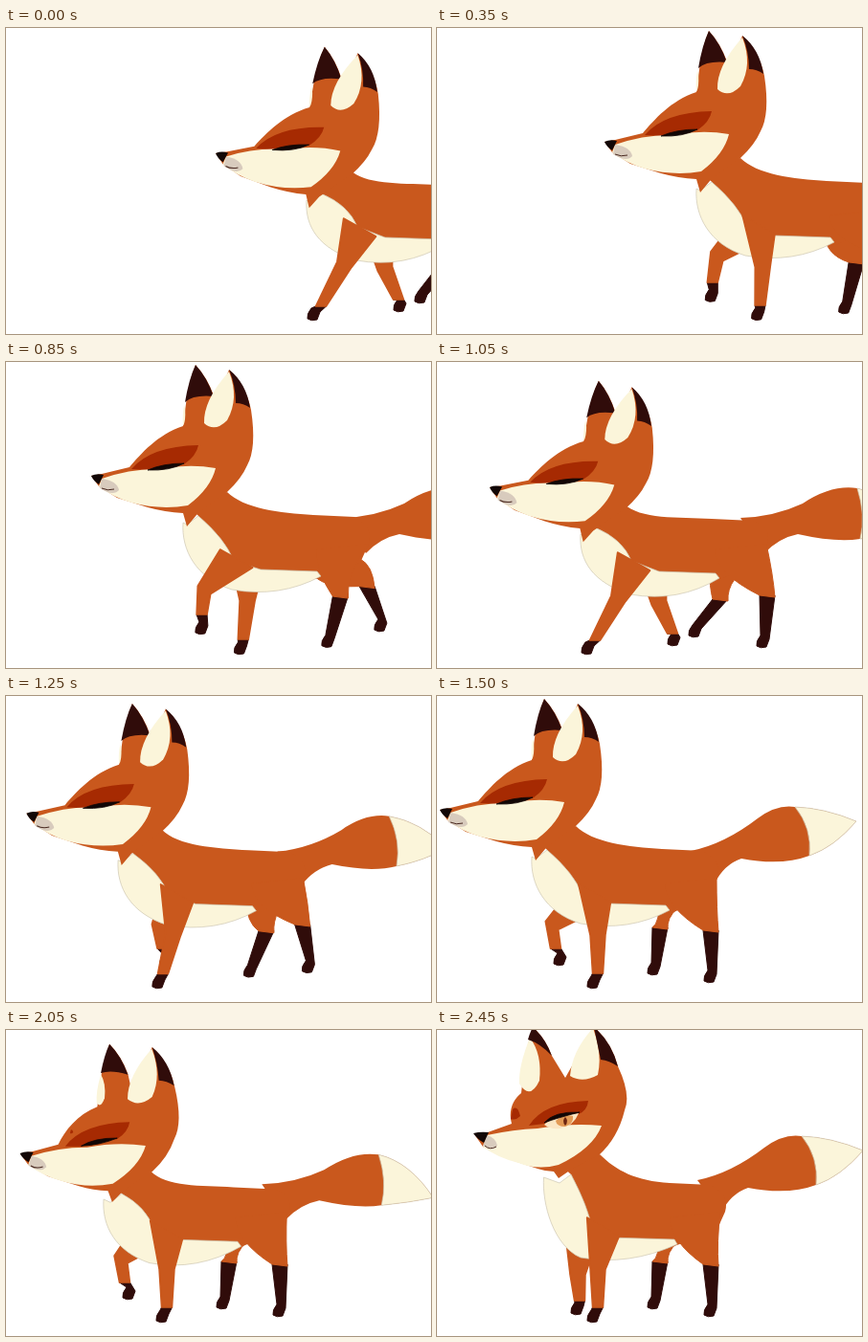
Animation, 444 px wide and 320 px high, one loop 2.5 s. Source, as an HTML page with a canvas:

```html
<!DOCTYPE html>
<html lang="en">
<head>
<meta charset="utf-8">
<title>Walking fox</title>
<style>
html, body { margin: 0; width: 100%; height: 100%; overflow: hidden; background: #fff; }
canvas { display: block; width: 444px; height: 320px; }
</style>
</head>
<body>
<canvas id="stage" width="444" height="320"></canvas>
<script>
const ctx = document.getElementById('stage').getContext('2d');
const LOOP = 2500, STEP = 50, CYCLE = 1050;
const ORANGE = '#c9581d', CREAM = '#fbf5da', DARK = '#300c0a', RED = '#a62a02', EDGE = '#cfc8b4';

const lerp = (a, b, k) => a + (b - a) * k;
const smooth = k => k * k * (3 - 2 * k);
const linear = k => k;
const blend = (a, b, k) => a.map((v, i) => lerp(v, b[i], k));

// Keys are [time, value, value, ...]; returns the values at t.
function track(t, keys, ease = smooth) {
  if (t <= keys[0][0]) return keys[0].slice(1);
  for (let i = 1; i < keys.length; i++) {
    const a = keys[i - 1], b = keys[i];
    if (t <= b[0]) return blend(a.slice(1), b.slice(1), ease((t - a[0]) / (b[0] - a[0])));
  }
  return keys[keys.length - 1].slice(1);
}

// Blends two path strings that share the same commands.
function morph(a, b, k) {
  const to = b.match(/-?\d+/g);
  let i = 0;
  return a.replace(/-?\d+/g, v => lerp(+v, +to[i++], k).toFixed(2));
}

function shape(path, color, edge, width = 1) {
  const p = new Path2D(path);
  if (color) { ctx.fillStyle = color; ctx.fill(p); }
  if (edge) { ctx.strokeStyle = edge; ctx.lineWidth = width; ctx.stroke(p); }
}

// Each head part: facing sideways, turned to the viewer, fill.
const HEAD = [
  ['M3 119L14 117L43 110C55 96 72 76 99 67L103 36Q106 18 112 3Q124 16 131 35L130 50L147 8Q165 25 170 50Q176 90 166 108Q160 122 145 136L113 160L103 172L99 158Q80 157 62 152L30 142L11 130Z',
   'M39 109L53 107L78 98C74 84 80 72 88 66L92 30Q96 10 100 -3Q113 8 120 27L134 50L164 -3Q182 12 189 38Q203 68 196 84Q189 113 169 131L140 146L127 155L122 148Q114 148 105 145L72 134L48 122Z', ORANGE],
  ['M100 45Q98 57 99 66Q100 66 101 60Q102 50 100 45', 'M97 8Q85 38 86 56Q97 74 107 53Q110 25 97 8', CREAM],
  ['M112 3Q105 18 101 42Q110 34 131 36Q124 16 112 3', 'M100 -3Q97 3 95 10Q108 14 120 27Q113 8 100 -3', DARK],
  ['M147 10Q120 40 121 64Q132 74 145 61Q158 38 147 10', 'M163 -2Q141 22 139 48Q152 56 168 47Q173 25 163 -2', CREAM],
  ['M147 8Q154 25 154 43Q162 43 169 48Q165 22 147 8', 'M164 -3Q167 12 171 31Q180 32 189 38Q182 12 164 -3', DARK],
  ['M62 95Q62 95 62 95Q62 95 62 95Z', 'M79 83Q84 78 87 90Q82 95 77 93Z', RED],
  ['M45 112Q65 88 115 87Q113 98 100 107Q80 107 62 113Z', 'M96 100Q112 75 158 74Q157 84 148 88Q128 87 112 98Z', RED],
  ['M14 122Q45 111 75 112Q105 106 133 111Q128 132 104 150Q75 155 45 147Q25 141 11 130Z',
   'M52 110Q80 104 105 103Q140 97 172 100Q163 124 127 141Q105 147 85 139Q62 133 48 122Z', CREAM],
  ['M14 122Q30 124 32 134Q26 141 12 132Z', 'M52 110Q62 113 63 121Q58 127 48 121Z', '#d8cbbd'],
  ['M3 119Q9 116 16 118L11 128Q5 124 3 119', 'M38 108Q45 106 54 107L49 118Q42 114 38 108', '#120706']
];
const MOUTH = ['M14 132Q20 135 27 133', 'M50 121Q55 126 62 122'];
const LASH = ['M62 113Q78 106 100 106Q85 114 62 113', 'M112 97Q122 85 149 86Q125 92 112 97'];
const TAIL = [
  'M265 162Q300 155 335 128Q355 113 374 116Q405 117 438 131Q415 158 389 167Q360 178 318 170Q300 176 290 196Z',
  'M265 163Q300 162 330 148Q360 128 387 132Q420 140 444 177Q420 182 390 185Q365 189 325 180Q305 184 290 200Z'];
const TAIL_TIP = [
  'M374 116Q405 117 438 131Q415 158 389 167Q392 138 374 116',
  'M387 132Q420 140 444 177Q420 182 390 185Q396 160 387 132'];

// Gait keys: phase, then knee, ankle and toe (front) or hock and toe (rear).
const FRONT = [
  [0, 137, 248, 113, 291, 106, 302], [.33, 168, 250, 165, 290, 163, 302],
  [.5, 180, 252, 194, 284, 196, 293], [.66, 150, 242, 155, 264, 160, 280],
  [.82, 119, 238, 116, 264, 116, 281], [1, 137, 248, 113, 291, 106, 302]];
const REAR = [
  [0, 293, 244, 289, 295], [.33, 291, 234, 307, 277], [.5, 244, 248, 218, 284],
  [.82, 264, 245, 252, 295], [1, 293, 244, 289, 295]];
const STAND = {
  nearFront: [168, 250, 168, 290, 164, 302], farFront: [120, 240, 124, 264, 129, 278],
  farFrontDown: [147, 256, 149, 283, 147, 294],
  nearRear: [286, 245, 286, 296], farRear: [233, 242, 227, 288]
};

function paw(x, y, half, tx, ty) {
  shape(`M${x - half} ${y}L${tx - 3} ${ty - 9}Q${tx - 8} ${ty - 3} ${tx - 7} ${ty + 2}Q${tx - 3} ${ty + 5} ${tx + 3} ${ty + 3}L${tx + 6} ${ty - 5}L${x + half} ${y}Z`, DARK, DARK);
}

function frontLeg([kx, ky, ax, ay, tx, ty], hipX, hipY) {
  const hx = hipX + (ax - 165) * .2;
  const dx = ax - hx, dy = ay - hipY, len = Math.hypot(dx, dy);
  const px = dy / len * 8, py = -dx / len * 8;
  paw(ax, ay, 5.5, tx, ty);
  shape(`M${hx - 17} ${hipY - 10}L${kx - px} ${ky - py}L${ax - 5.5} ${ay}L${ax + 5.5} ${ay}L${kx + px} ${ky + py}L${hx + 17} ${hipY + 9}Z`, ORANGE, ORANGE, 1.5);
}

function rearLeg([hx, hy, tx, ty], left, right, top) {
  paw(hx, hy, 8, tx, ty);
  shape(`M${left} ${top}Q${left + 1} ${top + 25} ${hx - 8} ${hy}L${hx + 8} ${hy + 2}Q${hx + 6} ${hy - 22} ${right} ${top - 6}Z`, ORANGE, ORANGE);
}

function drawBody(neckX, neckY, sink, turn) {
  const rumpX = turn * 8, rump = sink * 4;
  const throatX = 115 + neckX, throatY = 161 + neckY - turn * 4;
  const chestX = 99 + neckX * .5, chestY = 168 + neckY - turn * 8;
  shape(`M${145 + neckX} ${136 + neckY}C${162 + neckX} ${153 + neckY} ${200 + rumpX} ${158 + rump} ${235 + rumpX} ${160 + rump}L${278 + rumpX} ${162 + rump}Q${298 + rumpX} 172 ${293 + rumpX} 190L${284 + rumpX} 210L245 227L150 225L${throatX} ${throatY}L${105 + neckX} ${148 + neckY}Z`, ORANGE);
  const low = 238 + sink * 5;
  shape(`M${throatX} ${throatY}L${103 + neckX} ${throatY + 9}L${chestX} ${chestY}C${chestX - 2} ${chestY + 28} ${112 + neckX * .4} ${low - 12} 150 ${low}Q200 ${low + 9} ${243 + turn * 8} ${224 + sink * 2}L${239 + turn * 9} ${219 + sink * 2}L180 ${217 + sink * 2}L${152 + neckX * .4} 208Q${143 + neckX * .6} 185 ${throatX} ${throatY}`, CREAM, EDGE, .7);
}

function drawHead(turn, sink, open) {
  ctx.save();
  ctx.translate(3, 120 + sink * 12);
  ctx.rotate(sink * .042 * Math.max(0, 1 - 3 * turn));
  ctx.translate(-3, -120);
  for (const [side, front, color] of HEAD) shape(morph(side, front, turn), color);
  shape(morph(...MOUTH, turn), null, '#4a2a22');
  ctx.globalAlpha = open;
  shape('M112 99Q122 89 148 87Q143 100 129 103Q118 104 112 99', '#fbe6c4');
  shape('M124 95Q132 87 142 90Q143 98 134 101Q125 101 124 95', '#e39a55');
  shape('M134 91Q138 95 134 100Q130 95 134 91', '#6b2410');
  ctx.globalAlpha = 1;
  shape(morph(...LASH, turn), '#120706', '#120706', .8);
  ctx.restore();
}

function draw(t) {
  const [noseX] = track(t, [[0, 219], [50, 208], [350, 175], [550, 141], [850, 89], [1050, 55], [1100, 43], [1350, 7], [1500, 3]], linear);
  const [turn] = track(t, [[1800, 0], [2050, .33], [2200, .94], [2300, 1]]);
  const [open] = track(t, [[2200, 0], [2350, 1]]);
  const [settle] = track(t, [[1200, 0], [1450, 1]]);
  const [droop] = track(t, [[0, 1], [1100, 1], [1450, 0], [1750, 0], [2050, 1], [2300, 0]]);
  const phase = Math.min(t / CYCLE, 4 / 3);
  const [sink] = t < 1400
    ? track(phase % .5, [[0, 1], [.3, 0], [.36, 0], [.5, 1]])
    : track(t, [[1750, 0], [2000, 1.2], [2080, 1.1], [2200, .5], [2300, 0]]);

  const gait = (keys, shift, rest) => blend(track((phase + shift) % 1, keys, linear), rest, settle);
  const neckX = turn * 25 - sink * 2, neckY = sink * 12 - turn * 6;
  const [plant] = track(t, [[2060, 0], [2220, 1]]);
  const farRest = blend(STAND.farFront, STAND.farFrontDown, plant);

  ctx.fillStyle = '#fff';
  ctx.fillRect(0, 0, 444, 320);
  ctx.save();
  ctx.lineJoin = 'round';
  ctx.translate(noseX - 3, 0);

  rearLeg(gait(REAR, .5, STAND.farRear), 232, 284, 212);
  frontLeg(gait(FRONT, .5, farRest), lerp(165, 153, turn), 212);
  ctx.save();
  ctx.translate(turn * 7, -turn * 5);
  shape(morph(...TAIL, droop), ORANGE);
  shape(morph(...TAIL_TIP, droop), CREAM, EDGE, .7);
  ctx.restore();
  drawBody(neckX, neckY, sink, turn);
  rearLeg(gait(REAR, 0, STAND.nearRear), 238 + turn * 5, 292 + turn * 4, 196);
  frontLeg(gait(FRONT, 0, STAND.nearFront), 164 + turn * 9, 206 + sink * 3);
  drawHead(turn, sink, open);
  ctx.restore();
}

const start = performance.now();
function tick() {
  const t = (performance.now() - start) % LOOP;
  draw(Math.floor(t / STEP) * STEP);
  requestAnimationFrame(tick);
}
tick();
</script>
</body>
</html>
```
